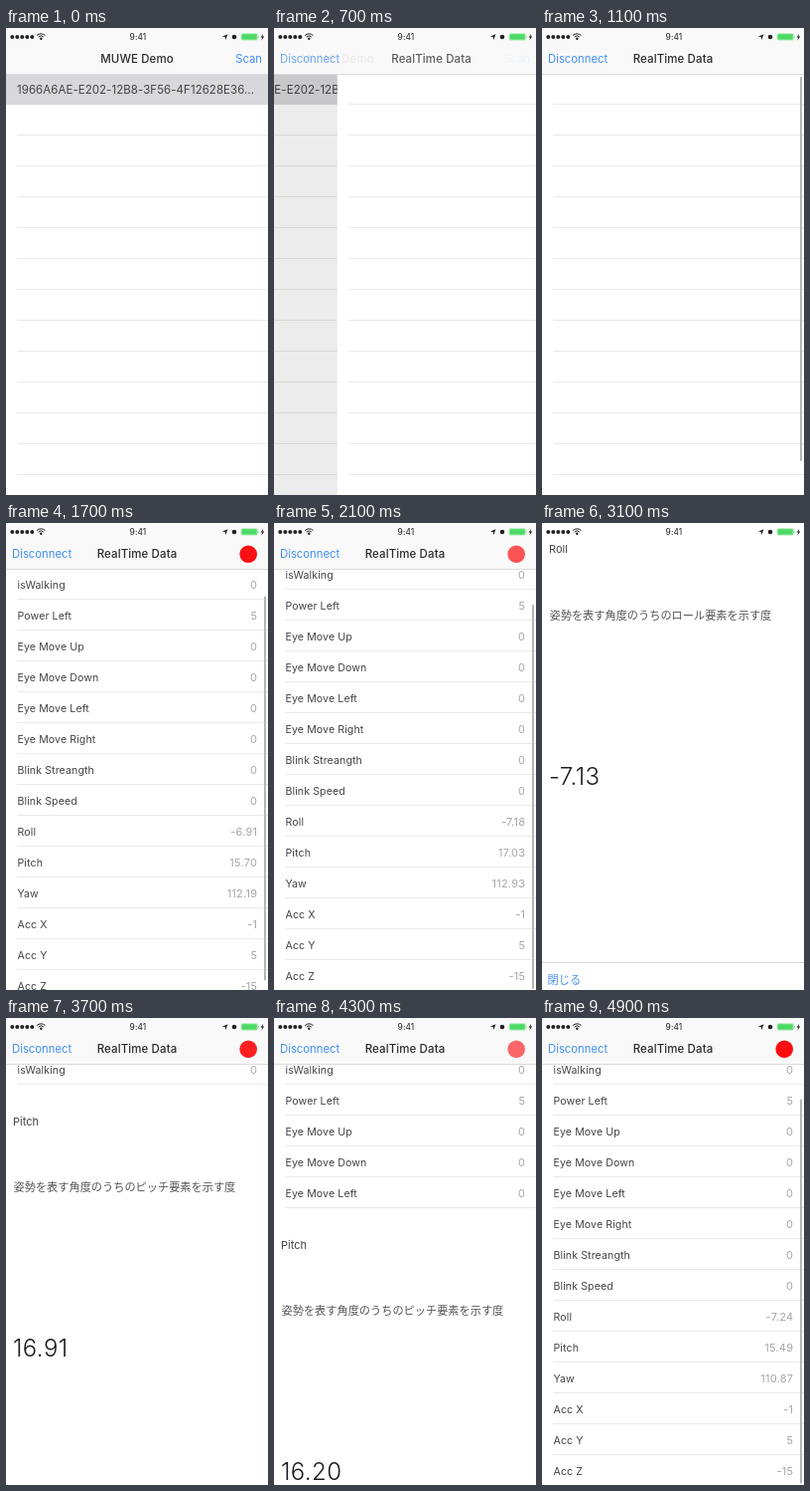
An HTML page with a canvas for the animation above (5000 ms loop, 264x469 px).

```html
<!DOCTYPE html>
<html lang="en">
<head>
<meta charset="utf-8">
<title>RealTime Data</title>
<style>
html, body { margin: 0; width: 100%; height: 100%; overflow: hidden; background: #fff; }
canvas { display: block; width: 264px; height: 469px; }
</style>
</head>
<body>
<canvas id="stage"></canvas>
<script>
const W = 264, H = 469, LOOP = 5000, STEP = 100;
const NAV = 46, ROW = 31;
const BLUE = '#428ef2', INK = '#434345', GREY = '#a6a6aa', LINE = '#eaeaec', PRESSED = '#d8d7d9';
const GREEN = '#4cd964', BLACK = '#222';
const SANS = 'Inter, Roboto, "Liberation Sans", sans-serif';
const CJK = '"Noto Sans CJK JP", "Noto Sans CJK", sans-serif';

const canvas = document.getElementById('stage');
const ctx = canvas.getContext('2d');
const ratio = window.devicePixelRatio || 1;
canvas.width = W * ratio;
canvas.height = H * ratio;

const rows = ['Fit Error', 'isWalking', 'Power Left', 'Eye Move Up', 'Eye Move Down',
  'Eye Move Left', 'Eye Move Right', 'Blink Streangth', 'Blink Speed',
  'Roll', 'Pitch', 'Yaw', 'Acc X', 'Acc Y', 'Acc Z'];
const fixed = { 'Power Left': '5', 'Acc X': '-1', 'Acc Y': '5', 'Acc Z': '-15' };
const sensors = {
  Roll: [[1200, -6.84], [1700, -6.91], [2100, -7.18], [3100, -7.13], [4900, -7.24]],
  Pitch: [[1200, 15.42], [1700, 15.7], [2100, 17.03], [3700, 16.91], [4900, 15.49]],
  Yaw: [[1200, 111.85], [1700, 112.19], [2100, 112.93], [4900, 110.87]]
};
const scroll = [[1300, 0], [1400, 4], [1500, 13], [1600, 23], [1700, 30.7],
  [1800, 35.5], [1900, 39], [2100, 41.3], [2300, 40.8]];
const barAlpha = [[1000, 0], [1100, 1], [2200, 1], [2400, 0], [4700, 0], [4800, 1]];
const sheets = [
  { name: 'Roll', kana: 'ロール', tap: 2400, open: 2480, close: 3120 },
  { name: 'Pitch', kana: 'ピッチ', tap: 3500, open: 3522, close: 4220 }
];

// Piecewise linear value through [time, value] points
function track(points, t) {
  if (t <= points[0][0]) return points[0][1];
  for (let i = 1; i < points.length; i++) {
    const [t0, v0] = points[i - 1], [t1, v1] = points[i];
    if (t <= t1) return v0 + (v1 - v0) * (t - t0) / (t1 - t0);
  }
  return points[points.length - 1][1];
}

// Critically damped spring from 0 to 1
function spring(ms) {
  if (ms <= 0) return 0;
  if (ms > 440) return 1;
  const x = ms * 0.01826;
  return 1 - Math.exp(-x) * (1 + x);
}

function rect(x, y, w, h, color) {
  ctx.fillStyle = color;
  ctx.fillRect(x, y, w, h);
}

function pill(x, y, w, h, r, color) {
  ctx.fillStyle = color;
  ctx.beginPath();
  ctx.roundRect(x, y, w, h, r);
  ctx.fill();
}

function disc(x, y, r, color) {
  ctx.fillStyle = color;
  ctx.beginPath();
  ctx.arc(x, y, r, 0, Math.PI * 2);
  ctx.fill();
}

function shape(points, color) {
  ctx.fillStyle = color;
  ctx.beginPath();
  points.forEach(([x, y]) => ctx.lineTo(x, y));
  ctx.fill();
}

// y is the vertical centre of the capitals
function text(str, x, y, { size = 11.3, weight = 400, color = INK, align = 'left',
  spacing = 0, family = SANS } = {}) {
  ctx.font = `${weight} ${size}px ${family}`;
  ctx.letterSpacing = spacing + 'px';
  ctx.textAlign = align;
  ctx.fillStyle = color;
  ctx.fillText(str, x, y + size * 0.36);
}

function withAlpha(alpha, draw) {
  ctx.save();
  ctx.globalAlpha = alpha;
  draw();
  ctx.restore();
}

function shifted(x, y, draw) {
  ctx.save();
  ctx.translate(x, y);
  draw();
  ctx.restore();
}

function reading(name, t) {
  return sensors[name] ? track(sensors[name], t).toFixed(2) : fixed[name] || '0';
}

function separators(offset) {
  for (let y = Math.round(NAV + ROW - 1 - offset); y < H; y += ROW) rect(11, y, W - 11, 1, LINE);
}

function deviceList() {
  rect(0, 0, W, H, '#fff');
  separators(0);
  rect(0, NAV, W, ROW, PRESSED);
  text('1966A6AE-E202-12B8-3F56-4F12628E36...', 11, 62, { size: 11.5, spacing: 0.05 });
}

function dataList(t) {
  const offset = track(scroll, t);
  rect(0, 0, W, H, '#fff');
  separators(offset);
  if (t >= 1200) {
    const active = sheets.find(s => t >= s.tap && t < s.close + 250);
    rows.forEach((name, i) => {
      const top = NAV + i * ROW - offset;
      if (active && active.name === name) rect(0, top, W, ROW, PRESSED);
      text(name, 11.5, top + 16.2, { size: 10.6, spacing: 0.1 });
      text(reading(name, t), 253.3, top + 16.2,
        { size: 11, spacing: 0.25, color: GREY, align: 'right' });
    });
  }
  withAlpha(track(barAlpha, t), () => pill(260, 49 + 33 * offset / 41.3, 2, 386, 1, '#b4b4b6'));
}

function navBar(t, pushed) {
  rect(0, 0, W, NAV, '#f9f9f9');
  rect(0, NAV, W, 1, '#dcdcde');
  const title = { size: 11.5, weight: 500, align: 'center', spacing: 0.1, color: '#2a2a2c' };
  withAlpha((1 - pushed) ** 2, () => {
    text('MUWE Demo', 132 - 90 * pushed, 31.3, title);
    text('Scan', 258, 31.3, { color: BLUE, align: 'right' });
  });
  withAlpha(pushed, () => {
    text('RealTime Data', 132 + 110 * (1 - pushed), 31.3, title);
    text('Disconnect', 6, 31.3, { color: BLUE });
  });
  if (t >= 1200) {
    const pulse = 0.8 + 0.2 * Math.cos((t - 1750) / 1050 * Math.PI * 2);
    withAlpha(pulse, () => disc(244.2, 31.2, 8.8, '#fc0d10'));
  }
}

function sheet({ name, kana }, t) {
  rect(0, 0, W, H, '#fff');
  text(name, 7, 26.5, { size: 11 });
  text(`姿勢を表す角度のうちの${kana}要素を示す度`, 7.5, 93,
    { size: 11.2, weight: 300, family: CJK, color: '#555' });
  text(reading(name, t), 7, 254, { size: 24, weight: 300, spacing: 0.4, color: '#1c1c1e' });
  rect(0, 441, W, 1, '#d6d6d8');
  text('閉じる', 5.5, 458.5, { size: 11.2, family: CJK, color: BLUE });
}

function statusBar() {
  for (let i = 0; i < 5; i++) disc(6.3 + i * 5, 9, 2, BLACK);

  ctx.strokeStyle = BLACK;
  ctx.lineWidth = 1;
  for (const r of [3.6, 5.8]) {
    ctx.beginPath();
    ctx.arc(35.3, 11.6, r, -Math.PI * 0.76, -Math.PI * 0.24);
    ctx.stroke();
  }
  disc(35.3, 10.8, 1.2, BLACK);

  text('9:41', 133, 9, { size: 8.3, weight: 500, align: 'center', spacing: 0.1, color: '#3a3a3c' });
  shape([[223.5, 6.2], [221.3, 12], [220.8, 9], [217.8, 8.6]], BLACK);
  disc(230, 9, 2.3, BLACK);

  pill(236.7, 5.2, 17, 7.4, 1.6, '#a4ebb0');
  pill(237.7, 6.2, 15, 5.4, 0.8, GREEN);
  rect(254, 7.8, 1, 2.4, '#a4ebb0');
  shape([[259.2, 5.8], [256.6, 9.5], [258.2, 9.5], [257.4, 12.4], [260.2, 8.5], [258.6, 8.5]], BLACK);
}

function render(t) {
  ctx.setTransform(ratio, 0, 0, ratio, 0, 0);
  const pushed = t < 600 ? 0 : spring(t - 550);
  if (pushed < 1) {
    shifted(-0.3 * W * pushed, 0, deviceList);
    withAlpha(0.1 * pushed, () => rect(0, 0, W, H, '#000'));
  }
  if (pushed > 0) shifted(W * (1 - pushed), 0, () => dataList(t));
  navBar(t, pushed);
  for (const s of sheets) {
    const shown = spring(t - s.open) - spring(t - s.close);
    if (shown > 0) shifted(0, H * (1 - shown), () => sheet(s, t));
  }
  statusBar();
}

const start = performance.now();
function frame() {
  const t = (performance.now() - start) % LOOP;
  render(Math.floor(t / STEP) * STEP);
  requestAnimationFrame(frame);
}
frame();
</script>
</body>
</html>
```
